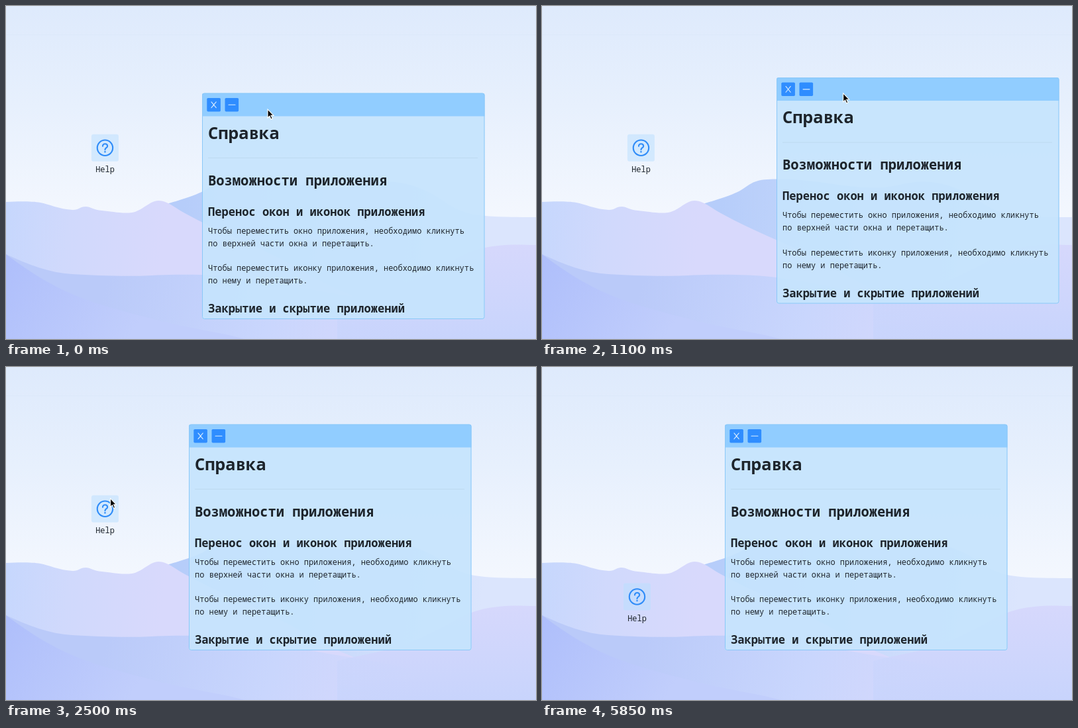
Recreate the animation shown at these times as an HTML page. Size 800 px wide and 503 px high, loop 5900 ms.

```html
<!DOCTYPE html>
<html lang="ru">
<head>
<meta charset="utf-8">
<title>Справка</title>
<style>
  html, body { margin: 0; width: 100%; height: 100%; overflow: hidden; }
  svg { display: block; width: 100%; height: 100%; }
  text { font: 500 11.95px "Noto Sans Mono", "DejaVu Sans Mono", monospace; fill: #1d242b; }
  .h1, .h2, .h3 { font-weight: 800; }
  .h1 { font-size: 25.6px; }
  .h2 { font-size: 20.48px; }
  .h3 { font-size: 17.07px; }
  .line { fill: none; stroke-linecap: round; }
</style>
</head>
<body>
<svg viewBox="0 0 800 503">
  <defs>
    <linearGradient id="sky" x2="0" y2="1">
      <stop stop-color="#deeafc"/><stop offset=".3" stop-color="#e7f0fd"/><stop offset=".62" stop-color="#f3f7fe"/>
    </linearGradient>
    <linearGradient id="back" gradientUnits="userSpaceOnUse" x1="270" y1="290" x2="720" y2="340">
      <stop stop-color="#b6cdfa"/><stop offset="1" stop-color="#dbe5fd"/>
    </linearGradient>
    <linearGradient id="left" gradientUnits="userSpaceOnUse" x1="0" y1="300" x2="240" y2="330">
      <stop stop-color="#c6d7fd"/><stop offset=".4" stop-color="#d0d9fc"/><stop offset="1" stop-color="#d8d9fc"/>
    </linearGradient>
    <linearGradient id="right" x2="0" y2="1">
      <stop stop-color="#d6d8fc"/><stop offset="1" stop-color="#c8d4fc"/>
    </linearGradient>
    <linearGradient id="front" gradientUnits="userSpaceOnUse" x1="160" y1="390" x2="640" y2="530">
      <stop stop-color="#bacaf9"/><stop offset=".5" stop-color="#c9d6fd"/>
      <stop offset="1" stop-color="#cbd5fc" stop-opacity="0"/>
    </linearGradient>
    <linearGradient id="wedge" gradientUnits="userSpaceOnUse" x1="0" y1="390" x2="180" y2="510">
      <stop stop-color="#afbffb"/><stop offset="1" stop-color="#c1cefc"/>
    </linearGradient>
    <clipPath id="frame"><rect width="426.5" height="341.5" rx="3"/></clipPath>
  </defs>

  <rect width="800" height="503" fill="url(#sky)"/>
  <path d="M0 43.5H800" stroke="#dce8fa" stroke-width=".7"/>
  <path fill="url(#back)" d="M230 303C260 294 280 288 295 281S315 263 340 262C420 258 480 285 540 270S640 280 668 300C685 310 700 315 723 317S770 319 800 319V503H230Z"/>
  <path fill="url(#left)" d="M0 296C20 295 40 295 52 297S80 307 101 308C110 308 112 303 120 303S132 308 145 309 175 314 190 312 217 294 230 294 252 303 270 313C320 341 370 358 420 385S490 425 530 440V503H0Z"/>
  <path fill="url(#right)" d="M500 444C540 434 570 430 600 420S645 400 668 388 705 367 735 363 780 361 800 361V503H500Z"/>
  <path fill="url(#front)" d="M0 375C35 391 65 403 100 405S180 409 220 407 310 405 345 409 460 429 523 439 700 475 800 503H0Z"/>
  <path fill="url(#wedge)" d="M0 375C35 401 60 417 95 433S180 462 230 475 320 492 360 503H0Z"/>

  <g id="icon">
    <rect width="41" height="41" rx="3" fill="#bae0ff" fill-opacity=".5"/>
    <g class="line" transform="translate(20.5 20.5)" stroke="#2f8cf8" stroke-width="2.1">
      <circle r="11.7"/>
      <path d="M-3.5 -2.6C-3.5 -7.2 3.7 -7.1 3.7 -2.6C3.7 .1 0 -.1 0 3"/>
      <path d="M0 5.9V6" stroke-width="2.4"/>
    </g>
    <text x="20.5" y="57.7" text-anchor="middle">Help</text>
  </g>

  <g id="win">
    <g clip-path="url(#frame)">
      <rect width="427" height="342" fill="#c6e4fd" fill-opacity=".92"/>
      <rect width="427" height="35" fill="#91cdff"/>
      <g fill="#2f8dff">
        <rect x="7.3" y="7.4" width="20.6" height="20.6" rx="1.7"/>
        <rect x="34.5" y="7.4" width="20.6" height="20.6" rx="1.7"/>
      </g>
      <path class="line" d="M14 13.4L21.2 22.2M21.2 13.4L14 22.2M40 17.8H50" stroke="#d9edff" stroke-width="1.1"/>
      <path d="M9 98H416" stroke="#bddaf0"/>
      <g id="copy"></g>
    </g>
    <rect x=".5" y=".5" width="425.5" height="340.5" rx="3" fill="none" stroke="#8bc8f8"/>
  </g>

  <path id="cursor" d="M0 0V13L2.9 10.3 5 15 7.2 14.1 5.1 9.4H9Z" stroke="#fff" stroke-width="1.1"/>
</svg>
<script>
const $ = id => document.getElementById(id);
const LOOP = 5900, STEP = 50, LAG = 8;

const copy = [
  ['h1', 69, 'Справка'],
  ['h2', 139.3, 'Возможности приложения'],
  ['h3', 185, 'Перенос окон и иконок приложения'],
  ['p', 212.4, 'Чтобы переместить окно приложения, необходимо кликнуть'],
  ['p', 231.2, 'по верхней части окна и перетащить.'],
  ['p', 268.7, 'Чтобы переместить иконку приложения, необходимо кликнуть'],
  ['p', 287.5, 'по нему и перетащить.'],
  ['h3', 331.9, 'Закрытие и скрытие приложений']
];
$('copy').innerHTML = copy.map(([kind, y, s]) => `<text class="${kind}" x="9" y="${y}">${s}</text>`).join('');

const part = (t, from, to) => Math.min(1, Math.max(0, (t - from) / (to - from)));
const ease = (t, from, to) => { const u = part(t, from, to); return u * u * (3 - 2 * u); };
const mix = (a, b, u) => a.map((v, i) => v + (b[i] - v) * u);
const add = (a, b) => a.map((v, i) => v + b[i]);

// Counterclockwise point on an ellipse, angle in degrees.
function orbit([cx, cy], [rx, ry], deg) {
  const a = deg * Math.PI / 180;
  return [cx + rx * Math.cos(a), cy - ry * Math.sin(a)];
}

// Both drags swing round an ellipse, then settle at a resting place.
function winAt(t) {
  const deg = -68 + 332.5 * part(t, 0, 800) + 136 * part(t, 800, 1400) + 117 * part(t, 1400, 1800);
  const swing = mix([296, 131.5], orbit([252, 96.5], [115, 25], deg), ease(t, 0, 200));
  return mix(swing, [276, 86.5], ease(t, 1800, 2050));
}

function iconAt(t) {
  const swing = orbit([141, 160], [45, 35], -105.5 + 285.5 * ease(t, 2950, 3600));
  return mix(swing, [123, 326.5], ease(t, 3600, 4080));
}

// The pointer runs slightly ahead of whatever it drags.
function cursorAt(t) {
  const onWin = add(winAt(t + LAG * part(t, 0, 50)), [99, 24.5]);
  const onIcon = add(iconAt(t + LAG), [21, 18.5]);
  const hover = mix(onWin, [157.5, 198.5], ease(t, 2100, 2500));
  return mix(mix(hover, onIcon, ease(t, 2600, 2900)), [205, -25], ease(t, 4800, 5350));
}

const place = (id, p) => $(id).setAttribute('transform', `translate(${p})`);

const start = performance.now();
function tick() {
  const t = Math.floor((performance.now() - start) % LOOP / STEP) * STEP;
  place('win', winAt(t));
  place('icon', iconAt(t));
  place('cursor', cursorAt(t));
  requestAnimationFrame(tick);
}
tick();
</script>
</body>
</html>
```
